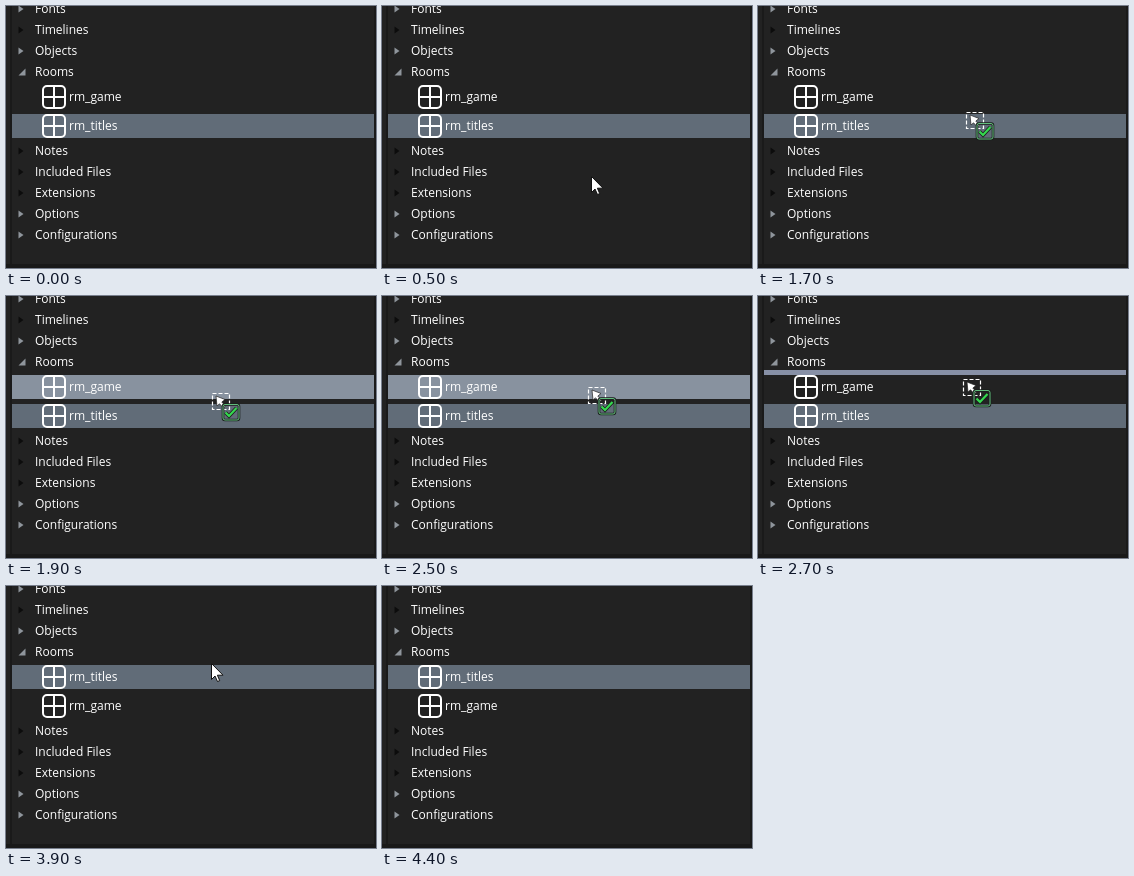
An HTML page with a canvas that plays this animation: 370 px wide and 262 px high, repeating every 5400 ms.

```html
<!DOCTYPE html>
<html lang="en">
<head>
<meta charset="utf-8">
<style>
  html, body { margin: 0; width: 100%; height: 100%; overflow: hidden; background: #222; }
  canvas { display: block; }
</style>
</head>
<body>
<canvas id="stage" width="370" height="262"></canvas>
<script>
const ctx = document.getElementById('stage').getContext('2d', { alpha: false });
const LOOP = 5400, STEP = 100;
const SELECTED = '#616c78', HOVER = '#88929f', LINE = '#8790a6';
const DIM = '#0c0c0c', LIT = '#8f959c';

// label, vertical centre, arrow colour
const folders = [
  ['Fonts', 3, LIT], ['Timelines', 24, DIM], ['Objects', 45, LIT], ['Rooms', 66, null],
  ['Notes', 145, DIM], ['Included Files', 166, DIM], ['Extensions', 187, DIM],
  ['Options', 208, LIT], ['Configurations', 229, LIT]
];

// top edge of the pointer at each step
const enterY = [248, 222, 200, 183, 170, 159, 150, 142, 136, 131, 127, 124];
const dragY = [116, 114, 112, 109, 106, 100, 97, 94];
const liftY = [91, 87, 83, 79, 77];

function rect(color, x, y, w, h) {
  ctx.fillStyle = color;
  ctx.fillRect(x, y, w, h);
}

function stroke(color, width) {
  ctx.strokeStyle = color;
  ctx.lineWidth = width;
  ctx.stroke();
}

function polygon(points, fill) {
  ctx.beginPath();
  points.forEach(([x, y]) => ctx.lineTo(x, y));
  ctx.closePath();
  ctx.fillStyle = fill;
  ctx.fill();
}

function label(text, x, centre) {
  ctx.fillStyle = '#fff';
  ctx.fillText(text, x, centre + 4);
}

function folder([name, y, color]) {
  if (color) polygon([[12.5, y - 3.5], [17.5, y], [12.5, y + 3.5]], color);
  else polygon([[19.5, y - 3.5], [19.5, y + 3.5], [12.5, y + 3.5]], LIT);
  label(name, 29, y);
}

function room(name, y) {
  ctx.beginPath();
  ctx.roundRect(37, y - 11, 22, 22, 4);
  ctx.moveTo(48, y - 11);
  ctx.lineTo(48, y + 11);
  ctx.moveTo(37, y);
  ctx.lineTo(59, y);
  stroke('#fff', 2);
  label(name, 63, y);
}

function at(x, y, drawShape) {
  ctx.save();
  ctx.translate(x, y);
  drawShape();
  ctx.restore();
}

function pointer() {
  polygon([[.5, .5], [.5, 16.5], [4, 13], [6.5, 18.5], [8.7, 17.6], [6.4, 12.2], [12, 12.2]], '#fff');
  stroke('#111', 1);
}

function dragPointer() {
  ctx.beginPath();
  ctx.rect(.5, .5, 17, 16);
  ctx.setLineDash([4, 2]);
  stroke('#fff', 1.2);
  ctx.setLineDash([]);

  polygon([[4, 3], [5, 13], [7.5, 10.8], [11.5, 15], [13.5, 13], [9.8, 9], [13, 6.5]], '#fff');
  stroke('#222', .7);

  // see-through badge with a dark edge around its frame and tick
  for (const [color, extra] of [['#1a1f1c', 1.6], ['#35d94f', 0]]) {
    ctx.beginPath();
    ctx.roundRect(11, 11.5, 16, 15.5, 2);
    stroke(extra ? color : '#62bd7c', 1 + extra);
    ctx.beginPath();
    ctx.moveTo(13.5, 19.5);
    ctx.lineTo(17, 23);
    ctx.lineTo(24.5, 15);
    stroke(color, 2.2 + extra);
  }
}

function drawPointer(step) {
  if (step >= 1 && step <= 12) {
    at(step <= 6 ? 209 : 210, enterY[step - 1], pointer);
  } else if (step >= 13 && step < 25) {
    const i = Math.min(step - 13, 7);
    at(i < 5 ? 208 : i < 6 ? 207 : 206, dragY[i], dragPointer);
  } else if (step >= 25 && step < 39) {
    const i = Math.min(step - 25, 4);
    at(i < 2 ? 206 : 205, liftY[i], dragPointer);
  } else if (step >= 39 && step < 44) {
    at(205, Math.round(77 + 8 * (step - 39) ** 2), pointer);
  }
}

function draw(step) {
  const dropped = step >= 39;
  rect('#222', 0, 0, 370, 262);
  rect('#1a1a1a', 4, 0, 2, 258);
  rect('#1a1a1a', 368, 0, 2, 258);
  rect('#191919', 0, 258, 370, 4);
  if (step >= 18 && step < 27) rect(HOVER, 6, 79, 362, 24);
  rect(SELECTED, 6, dropped ? 79 : 108, 362, 24);
  if (step >= 27 && !dropped) rect(LINE, 6, 74, 362, 5);

  ctx.font = '12px "Open Sans", sans-serif';
  folders.forEach(folder);
  room('rm_game', dropped ? 120 : 91);
  room('rm_titles', dropped ? 91 : 120);
  drawPointer(step);
}

function tick() {
  draw(Math.floor(performance.now() % LOOP / STEP));
  requestAnimationFrame(tick);
}
tick();
</script>
</body>
</html>
```
